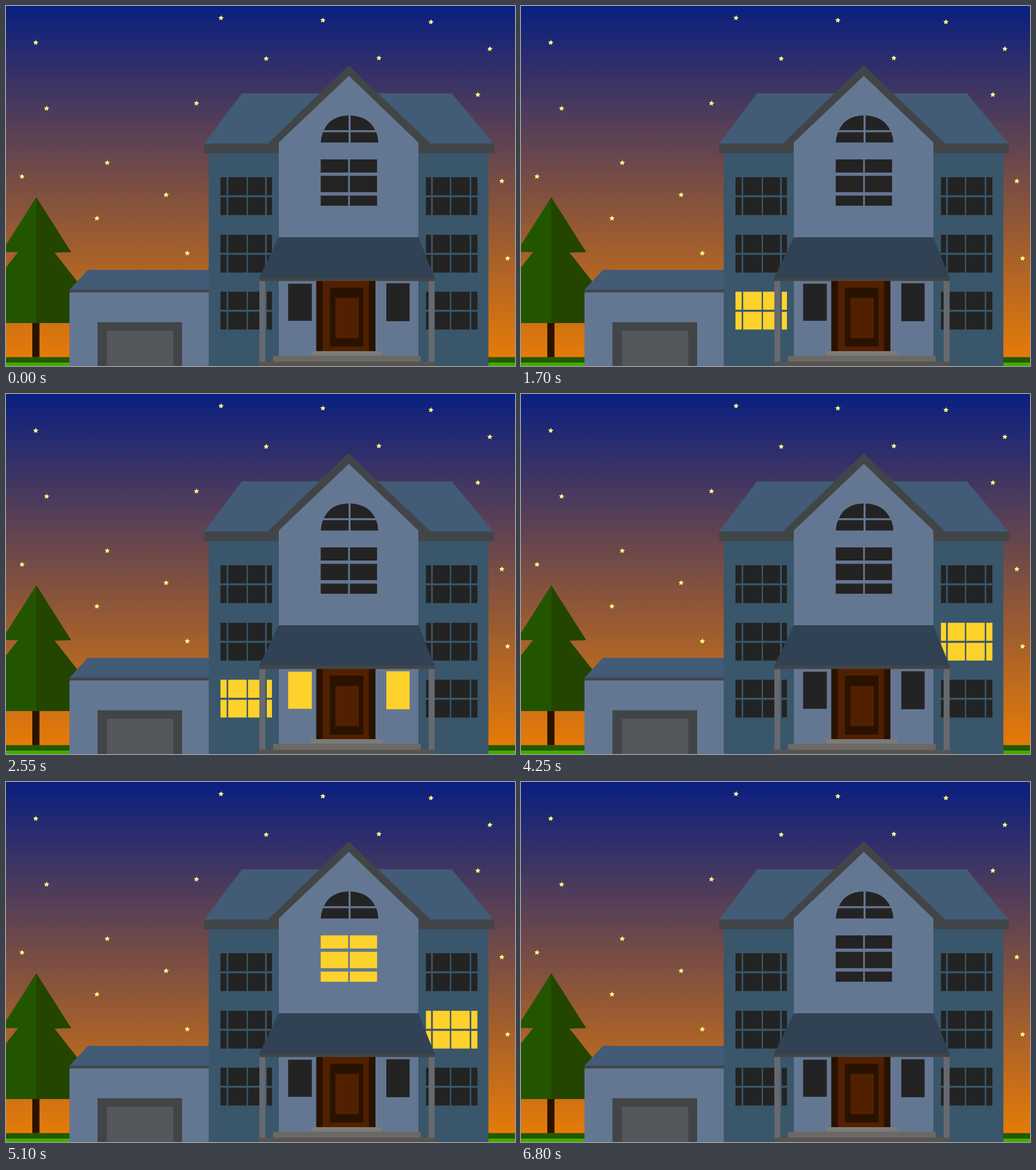
These frames come from a looping animation (890 by 629 pixels, 7650 ms). An HTML page:

```html
<!DOCTYPE html>
<html lang="en">
<head>
<meta charset="utf-8">
<title>House at dusk</title>
<style>
  html, body { margin: 0; width: 100%; height: 100%; overflow: hidden; }
  svg { display: block; width: 890px; height: 629px; }
  .pane { fill: #232323; animation: 7.65s step-end infinite; }
  .wall { fill: #647792; }
  .roof { fill: #425b77; }
  .trim { fill: #424547; }
  .wood { fill: #512000; }
  .dark-wood { fill: #2a1200; }
  .post { fill: #66696f; }

  /* The loop has nine equal steps of 850 ms. */
  #hall { animation-name: hall; }
  #den { animation-name: den; }
  #study { animation-name: study; }
  #stairs { animation-name: stairs; }
  #bedroom { animation-name: bedroom; }
  @keyframes hall {
    11.1111%, 33.3333% { fill: #ffd22b; }
    0%, 22.2222%, 44.4444%, 100% { fill: #232323; }
  }
  @keyframes den {
    22.2222% { fill: #ffd22b; }
    0%, 55.5555%, 100% { fill: #232323; }
  }
  @keyframes study {
    44.4444% { fill: #ffd22b; }
    0%, 77.7777%, 100% { fill: #232323; }
  }
  @keyframes stairs {
    66.6666% { fill: #ffd22b; }
    0%, 77.7777%, 100% { fill: #232323; }
  }
  @keyframes bedroom {
    77.7777% { fill: #ffd22b; }
    0%, 88.8888%, 100% { fill: #232323; }
  }
</style>
</head>
<body>
<svg viewBox="0 0 890 629">
  <defs>
    <linearGradient id="sky" x1="0" y1="0" x2="0" y2="1">
      <stop offset="0" stop-color="#0a1f80"/>
      <stop offset="1" stop-color="#e67b08"/>
    </linearGradient>
  </defs>
  <rect width="890" height="614" fill="url(#sky)"/>
  <path id="stars" fill="#ffff82"/>

  <g id="ground">
    <rect y="613.5" width="890" height="10" fill="#235803"/>
    <rect y="623" width="890" height="6" fill="#46aa00"/>
  </g>

  <g id="tree">
    <rect x="46" y="554" width="12.5" height="59.5" class="dark-wood"/>
    <path fill="#235500" d="M53 334L-8 430H21L-76 554H53Z"/>
    <path fill="#234500" d="M53 334L114 430L85 431L182 554H53Z"/>
  </g>

  <g id="garage">
    <rect x="111" y="499" width="244" height="130" class="wall"/>
    <path class="roof" d="M143 461H355V496H111Z"/>
    <rect x="111" y="495.5" width="244" height="5" class="trim"/>
    <rect x="160" y="552.5" width="148" height="77" class="trim"/>
    <rect x="176.5" y="567.5" width="116" height="62" fill="#54575b"/>
  </g>

  <g id="house">
    <rect x="354.5" y="256" width="489" height="373" fill="#39566b"/>
    <path class="roof" d="M412.5 152.5H779.5L853 241H346Z"/>
    <rect x="346.5" y="240.5" width="507" height="16.5" class="trim"/>
    <path class="trim" d="M599 103.5L743 241H457Z"/>
    <path class="wall" d="M599.5 122L721 238.5V629H477V238.5Z"/>
  </g>

  <g id="windows">
    <path class="pane" id="arch"/>
    <path class="pane" id="stairs"/>
    <path class="pane" id="bedroom"/>
    <path class="pane" id="left-mid"/>
    <path class="pane" id="den"/>
    <path class="pane" id="right-top"/>
    <path class="pane" id="study"/>
    <path class="pane" id="right-low"/>
    <path class="pane" id="hall"/>
  </g>

  <g id="porch">
    <rect x="542.5" y="480" width="103.5" height="124" class="dark-wood"/>
    <rect x="554" y="480" width="80.5" height="124" class="wood"/>
    <rect x="566.5" y="492" width="58.5" height="103" class="dark-wood"/>
    <rect x="576" y="510" width="41" height="70.5" class="wood"/>
    <rect x="443" y="479" width="10.5" height="143" class="post"/>
    <rect x="739" y="479" width="10.5" height="143" class="post"/>
    <rect x="533" y="603" width="125" height="9" fill="#7b7b79"/>
    <rect x="467" y="611" width="258" height="11" fill="#6b6865"/>
    <rect x="443" y="621.5" width="307" height="8" fill="#585450"/>
    <path fill="#304253" d="M477 404H721L749.5 475H442.5Z"/>
    <rect x="442.5" y="474.5" width="307" height="6" class="trim"/>
  </g>
</svg>
<script>
  const setPath = (id, d) => document.getElementById(id).setAttribute('d', d);

  const grid = (columns, rows) => rows.map(([top, bottom]) =>
    columns.map(([left, right]) => `M${left} ${top}H${right}V${bottom}H${left}Z`).join('')).join('');

  const star = ([x, y]) => {
    const points = Array.from({ length: 10 }, (_, i) => {
      const radius = i % 2 ? 2.3 : 5;
      const angle = i * Math.PI / 5 - Math.PI / 2 + 0.12;
      return `${(x + radius * Math.cos(angle)).toFixed(2)} ${(y + radius * Math.sin(angle)).toFixed(2)}`;
    });
    return `M${points.join('L')}Z`;
  };

  const stars = [[52, 64], [376, 21], [554, 25], [743, 28], [846, 75], [455, 92], [652, 91],
    [825, 155], [333, 170], [71, 179], [177, 274], [28, 298], [280, 330], [159, 371],
    [317, 432], [867, 306], [877, 441]];
  setPath('stars', stars.map(star).join(''));

  // The right wing mirrors the left one.
  const leftColumns = [[375, 385.8], [388.5, 420.8], [423.2, 453], [456, 465]];
  const rightColumns = leftColumns.map(([a, b]) => [1199.3 - b, 1199.3 - a]);
  const sash = top => [[top, top + 31.5], [top + 35, top + 66]];
  const wing = (ids, columns) => ids.forEach((id, floor) =>
    setPath(id, grid(columns, sash([299.2, 399.8, 499.2][floor]))));
  wing(['bedroom', 'left-mid', 'den'], leftColumns);
  wing(['right-top', 'study', 'right-low'], rightColumns);

  setPath('stairs', grid([[550.3, 598.3], [601.3, 648.8]], [[268, 291], [296.8, 325.3], [331.3, 349]]));
  setPath('hall', grid([[493.3, 534.7]], [[485.3, 550]]) + grid([[665, 705.7]], [[484.5, 550.7]]));
  setPath('arch', 'M556 217Q567 192 599 191.3V217ZM602.5 191.3Q634 193 645.5 217H602.5Z' +
    'M554.3 220.5H599V238.5H550.3Q550.7 229 554.3 220.5ZM602.5 220.5H647.3Q650.7 229 651 238.5H602.5Z');
</script>
</body>
</html>
```
